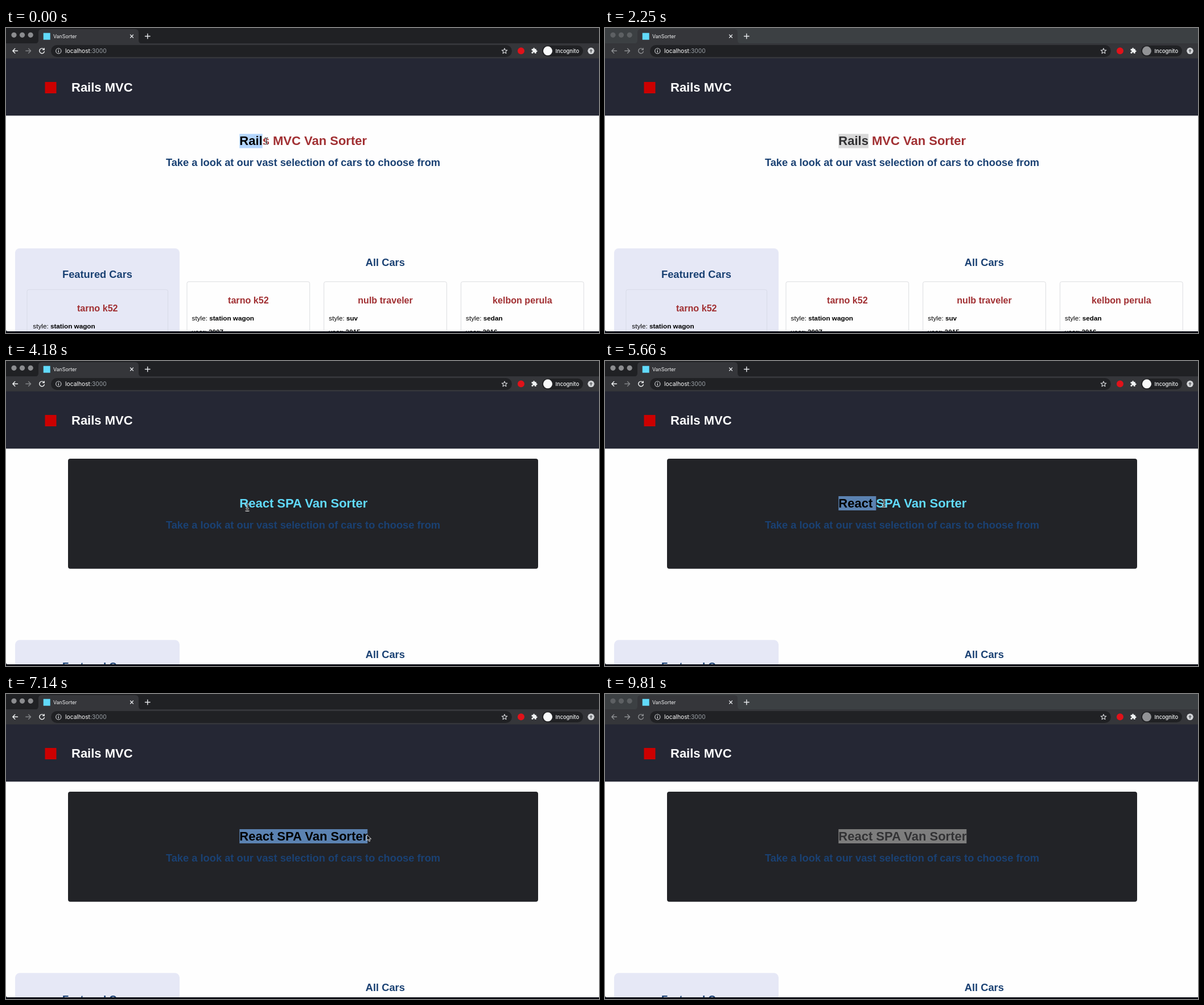
Write an HTML page that moves like this. It is 1042 px wide and 537 px high and loops after 9910 ms.

```html
<!DOCTYPE html>
<html lang="en">
<head>
<meta charset="utf-8">
<title>VanSorter</title>
<style>
  html, body { margin: 0; width: 100%; height: 100%; overflow: hidden; background: #fff; }
  svg { display: block; width: 100%; height: 100%; }
  text { font-family: "Liberation Sans", Arial, sans-serif; white-space: pre; }
  .ui { font-family: Inter, Roboto, sans-serif; }
  .h1 { font-size: 22px; font-weight: 700; }
  .h2 { font-size: 18.3px; font-weight: 700; fill: #1a4173; text-anchor: middle; }
  .h3 { font-size: 16.1px; font-weight: 700; fill: #a13033; text-anchor: middle; }
  .row { font-size: 11.73px; fill: #000; }
  .bold { font-weight: 700; }
  .line { fill: none; stroke-width: 1.4; stroke-linecap: round; stroke-linejoin: round; }
</style>
</head>
<body>
<svg viewBox="0 0 1042 537" xmlns="http://www.w3.org/2000/svg">
  <defs>
    <clipPath id="selClip"><rect id="clipBox" height="26"/></clipPath>
  </defs>

  <!-- page -->
  <rect width="1042" height="537" fill="#fefefe"/>
  <rect y="53" width="1042" height="101.3" fill="#252734"/>
  <rect x="68.5" y="95" width="20" height="20" fill="#cc0000"/>
  <text class="h1" x="115" y="112" fill="#fff">Rails MVC</text>

  <rect id="panel" x="109" y="172" width="826" height="193.7" rx="4" fill="#222327"/>
  <g id="hero">
    <text id="title" class="h1" x="410.3" y="206.4"></text>
    <rect id="sel" x="410.3" y="186.5" height="25"/>
    <text id="selText" class="h1" x="410.3" y="206.4" clip-path="url(#selClip)"></text>
    <text class="h2" x="522" y="243">Take a look at our vast selection of cars to choose from</text>
  </g>
  <g id="lists">
    <rect x="16" y="388" width="289" height="170" rx="8" fill="#e6e8f6"/>
    <text class="h2" x="160.5" y="440.3">Featured Cars</text>
    <text class="h2" x="666.3" y="419.3">All Cars</text>
  </g>
  <path d="M0 534H1042V537H0zM0 531Q0 534 3 534H0z" fill="#0b0e16"/>

  <!-- browser bar -->
  <rect id="strip" width="1042" height="28"/>
  <path d="M51 27.5Q57 27.5 57 21V8Q57 2 63 2H227Q233 2 233 8V21Q233 27.5 239 27.5z" fill="#35363a"/>
  <rect y="27" width="1042" height="26.5" fill="#35363a"/>
  <g id="lights">
    <circle cx="14" cy="12.3" r="4.6"/><circle cx="28.5" cy="12.3" r="4.6"/><circle cx="43.2" cy="12.3" r="4.6"/>
  </g>
  <rect id="tabIcon"/>
  <text class="ui" x="83" y="17.6" font-size="8.8" fill="#f0f1f2">VanSorter</text>
  <g class="line" stroke="#e8eaed">
    <path d="M218.5 12l5 5m0-5l-5 5" stroke-width="1.2"/>
    <path d="M244.5 14.5h8.6m-4.3-4.3v8.6"/>
  </g>
  <g id="nav" class="line">
    <path d="M20.5 40.3H11.8m4-4l-4 4 4 4"/>
    <path id="reload" d="M66.6 37.6A4.4 4.4 0 1 0 67.4 41.4M67.2 35.6V38.4H64.4"/>
  </g>
  <path id="forward" class="line" d="M34.8 40.3H43.6m-4-4l4 4-4 4"/>
  <rect x="79" y="30" width="810" height="21" rx="10.5" fill="#202124"/>
  <g class="line" stroke="#d5d7da" stroke-width="1">
    <circle cx="92.3" cy="40.4" r="4.6" style="stroke-width:1.1"/>
    <path d="M92.3 40.2v2.4m0-4.4v.1"/>
  </g>
  <text class="ui" x="104" y="44" font-size="10.3" fill="#fff">localhost<tspan fill="#9aa0a6">:3000</tspan></text>
  <path id="star" class="line" stroke="#d5d7da" style="stroke-width:1.1"/>
  <circle cx="905" cy="40.3" r="6" fill="#e0121a"/>
  <path transform="translate(922.6 34.3) scale(.48)" fill="#f1f3f4" d="M20.5 11H19V7c0-1.1-.9-2-2-2h-4V3.5a2.5 2.5 0 0 0-5 0V5H4c-1.1 0-2 .9-2 2v3.8h1.5c1.5 0 2.7 1.2 2.7 2.7s-1.2 2.7-2.7 2.7H2V20c0 1.1.9 2 2 2h3.8v-1.5c0-1.5 1.2-2.7 2.7-2.7s2.7 1.2 2.7 2.7V22H17c1.1 0 2-.9 2-2v-4h1.5a2.5 2.5 0 0 0 0-5z"/>
  <rect x="942" y="30.7" width="72" height="19.3" rx="9.6" fill="#202124"/>
  <circle id="badge" cx="952" cy="40.3" r="8"/>
  <text class="ui" x="965.5" y="43.8" font-size="9.3" font-weight="500" fill="#f1f3f4">Incognito</text>
  <circle cx="1028" cy="40.3" r="5.8" fill="#d3d5d8"/>
  <path d="M1028 37l3 3.3h-2v2.9h-2v-2.9h-2z" fill="#6b6e72"/>

  <!-- pointers -->
  <path id="arrow" d="M0 0V10.2L2.4 8 4 11.7 5.8 11 4.2 7.4H7.6z" fill="#000" stroke="#fff" stroke-width=".9" stroke-linejoin="round"/>
  <g id="beam" fill="none" stroke-linecap="round">
    <path d="M-2.4-6Q0-6 0-4.4Q0-6 2.4-6M0-4.4V4.4M-2.4 6Q0 6 0 4.4Q0 6 2.4 6M-1.5 2.2h3" stroke="#fff" stroke-width="2.2"/>
    <path d="M-2.4-6Q0-6 0-4.4Q0-6 2.4-6M0-4.4V4.4M-2.4 6Q0 6 0 4.4Q0 6 2.4 6M-1.5 2.2h3" stroke="#111" stroke-width="1"/>
  </g>
</svg>

<script>
const LOOP = 9910, TICK = 147.2;
const $ = id => document.getElementById(id);
const NS = "http://www.w3.org/2000/svg";

function set(el, attrs) {
  for (const k in attrs) el.setAttribute(k, attrs[k]);
}
function show(el, on) {
  el.style.display = on ? "" : "none";
}
function add(parent, tag, attrs, text = "") {
  const el = document.createElementNS(NS, tag);
  set(el, attrs);
  el.textContent = text;
  parent.appendChild(el);
  return el;
}

function field(x, y, label, value) {
  const t = add($("lists"), "text", { class: "row", x, y }, label + ": ");
  add(t, "tspan", { class: "bold" }, value);
}
function card(x, y, width, inset, name, style, year, border) {
  add($("lists"), "rect", { x, y, width, height: 120, rx: 3, fill: "none", stroke: border });
  add($("lists"), "text", { class: "h3", x: x + width / 2, y: y + 38 }, name);
  field(x + inset, y + 68.6, "style", style);
  field(x + inset, y + 92.6, "year", year);
}
card(37, 460.7, 247.5, 10.3, "tarno k52", "station wagon", "2007", "#d8dbe8");
card(318, 446.7, 215.7, 8.6, "tarno k52", "station wagon", "2007", "#dcdde0");
card(558.7, 446.7, 215.7, 8.6, "nulb traveler", "suv", "2015", "#dcdde0");
card(799.5, 446.7, 215.7, 8.6, "kelbon perula", "sedan", "2016", "#dcdde0");

const starPoints = Array.from({ length: 10 }, (_, i) => {
  const a = i * Math.PI / 5 - Math.PI / 2, r = i % 2 ? 2.2 : 5;
  return (876 + r * Math.cos(a)).toFixed(2) + " " + (40.7 + r * Math.sin(a)).toFixed(2);
});
$("star").setAttribute("d", "M" + starPoints.join("L") + "z");

// Pointer moves: first step, last step, step count, end x, end y, ease power
const moves = [
  [750, 900, 2, 852, 471],
  [1200, 1500, 3, 964, 525],
  [2390, 2390, 1, 785, 331],
  [3590, 3885, 3, 545, 309],
  [4030, 4178, 2, 424, 258],
  [4330, 4620, 3, 413, 253],
  [4770, 5810, 8, 501, 250.5],
  [5960, 6990, 8, 633.5, 250, 1.5],
  [7140, 7140, 1, 634, 247.7],
  [7440, 7740, 3, 568.5, 251],
  [8490, 8640, 2, 698.5, 362.5],
  [8930, 9230, 3, 941, 521]
];

function pointer(t) {
  let x = 457.5, y = 199;
  for (const [t0, t1, n, ex, ey, pow = 1] of moves) {
    if (t < t0) break;
    const step = n === 1 ? 1 : Math.min(n, Math.floor((t - t0) / (t1 - t0) * (n - 1) + 0.02) + 1);
    const u = 1 - Math.pow(1 - step / n, pow);
    x += (ex - x) * u;
    y += (ey - y) * u;
  }
  return { x, y };
}

function overText({ x, y }, shift) {
  const inside = (l, r, top, h) => x > l && x < r && y > top + shift && y < top + shift + h;
  return inside(409, 633.8, 186.5, 25) || inside(281, 763, 227, 21);
}

// Number of selected letters; the highlight trails the pointer by one step
function selected(t, react) {
  if (!react) return t < 150 ? 4 : 5;
  if (t < 4770) return 0;
  const title = $("title"), count = title.textContent.length;
  if (t >= 7140) return count;
  const x = pointer(t - TICK).x - 410.3;
  let best = 0, gap = Math.abs(x);
  for (let n = 1; n <= count; n++) {
    const d = Math.abs(title.getSubStringLength(0, n) - x);
    if (d < gap) { gap = d; best = n; }
  }
  return best;
}

function draw(t) {
  const react = t >= 2390;
  const idle = t >= 9810 || (t >= 2250 && !react);
  const heading = react ? "React SPA Van Sorter" : "Rails MVC Van Sorter";
  if ($("title").textContent !== heading) {
    $("title").textContent = $("selText").textContent = heading;
  }
  set($("title"), { fill: react ? "#61dafb" : "#a13033" });
  show($("panel"), react);
  set($("hero"), { transform: `translate(0 ${react ? 51.5 : 0})` });
  set($("lists"), { transform: `translate(0 ${react ? 103.3 : 0})` });

  const n = selected(t, react);
  const width = n ? $("title").getSubStringLength(0, n) : 0;
  const active = react ? "#5b82b1" : "#b3d5fd", faded = react ? "#7d7d7d" : "#d8d8d8";
  set($("sel"), { width, fill: idle ? faded : active });
  set($("clipBox"), { x: 410.3, y: 186, width });
  set($("selText"), { fill: idle ? "#323234" : "#000" });

  set($("strip"), { fill: idle ? "#3c4043" : "#202124" });
  set($("lights"), { fill: idle ? "#5d6063" : "#8b8c8f" });
  set($("nav"), { stroke: idle ? "#8d8f92" : "#f1f3f4" });
  set($("forward"), { stroke: idle ? "#8d8f92" : "#828487" });
  set($("reload"), { stroke: idle ? "#8d8f92" : "#f1f3f4" });
  set($("badge"), { fill: idle ? "#929396" : "#f8f9fa" });

  const loading = react && t < 2540;
  set($("tabIcon"), loading
    ? { x: 66.5, y: 9.5, width: 10, height: 10, rx: 5, fill: "#2fa3bd" }
    : { x: 65.7, y: 8.7, width: 12, height: 12, rx: 0, fill: "#61dafb" });

  const p = pointer(t);
  const hidden = (t >= 1650 && !react) || t >= 9380;
  const beam = overText(p, react ? 51.5 : 0);
  show($("arrow"), !hidden && !beam);
  show($("beam"), !hidden && beam);
  set($(beam ? "beam" : "arrow"), { transform: `translate(${p.x} ${p.y})` });
}

function frame() {
  draw(performance.now() % LOOP);
  requestAnimationFrame(frame);
}
frame();
</script>
</body>
</html>
```
